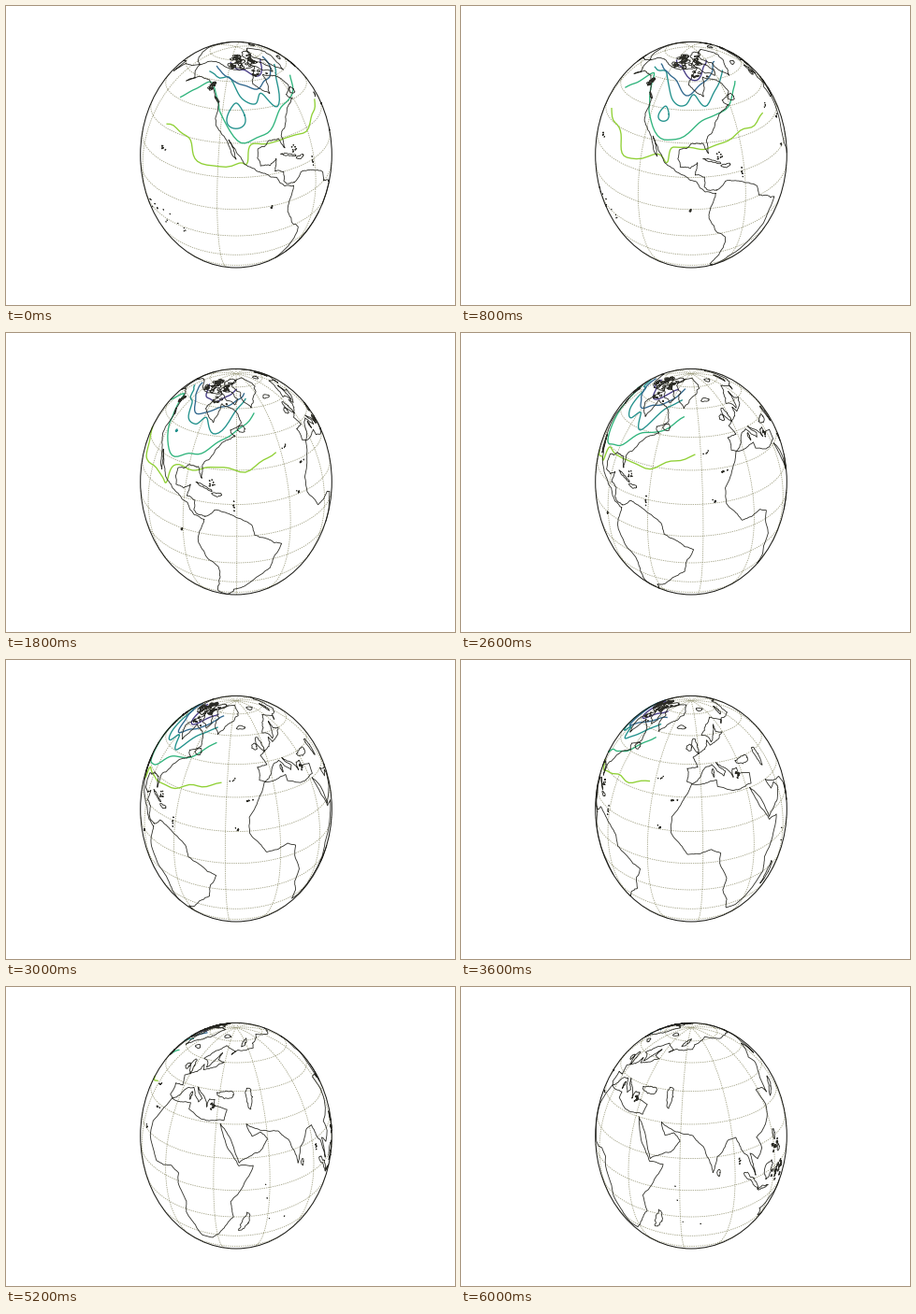
Animation, 480 px wide and 320 px high, one loop 6200 ms. Source, as a matplotlib script:

```python
import numpy as np
import matplotlib.pyplot as plt
from matplotlib.animation import FuncAnimation
from matplotlib.patches import Ellipse

W, H, DPI = 480, 320, 100
FRAMES, STEP_MS = 31, 200
CX, CY, RX, RY = 246, 159.2, 102.3, 120.8
LAT0 = 25
P = 6.61                       # viewer distance in globe radii
K = np.sqrt(P * P - 1)
rng = np.random.default_rng(4)


def center_lon(i):
    return np.interp(i, [0, 4, FRAMES - 1], [-110, -90.5, 66])


def unit(lon, lat):
    lon, lat = np.radians(lon), np.radians(lat)
    return np.stack([np.cos(lat) * np.cos(lon), np.cos(lat) * np.sin(lon),
                     np.sin(lat) + 0 * lon], -1)


def project(pts, lon0):
    """Perspective view of the globe; points behind the limb become gaps."""
    up, east = unit(lon0, LAT0), unit(lon0 + 90, 0)
    x, y, z = np.stack([east, np.cross(up, east), up]) @ pts.T
    far = z < 1 / P
    sx = CX + RX * K * x / (P - z)
    sy = CY - RY * K * y / (P - z)
    sx[far] = np.nan
    return sx, sy


def join(parts):
    gap = np.full((1, 3), np.nan)
    return np.vstack([a for p in parts for a in (p, gap)])


# ---------------------------------------------------------------- coastlines
coasts = []


def coast(p, rough=0.11, levels=4):
    """Fractal shore through a few key points (lon, lat)."""
    p = np.array(p, float).reshape(-1, 2)
    for _ in range(levels):
        a, d = p[:-1], np.diff(p, axis=0)
        squash = np.maximum(np.cos(np.radians(a[:, 1])), 0.2)
        k = rng.uniform(-rough, rough, len(d))
        out = np.empty((2 * len(p) - 1, 2))
        out[::2] = p
        out[1::2] = a + d / 2 + np.stack([k * d[:, 1] / squash, -k * d[:, 0] * squash], 1)
        p = out
    coasts.append(unit(p[:, 0], p[:, 1]))


def island(lon, lat, rx, ry, tilt=0):
    t = np.linspace(0, 2 * np.pi, 10)
    wave = 1 + 0.15 * np.sin(3 * t + rng.uniform(0, 6))
    x, y, a = rx * wave * np.cos(t), ry * wave * np.sin(t), np.radians(tilt)
    u, v = x * np.cos(a) + y * np.sin(a), y * np.cos(a) - x * np.sin(a)
    coast(np.stack([lon + u / np.cos(np.radians(lat)), lat + v], 1), 0.2, 2)


def islands(n, lons, lats, size):
    """Seeded archipelago inside a box."""
    for _ in range(n):
        r = size * rng.uniform(0.4, 1)
        island(rng.uniform(*lons), rng.uniform(*lats), r, r * rng.uniform(0.5, 1),
               rng.uniform(-50, 50))


# North America, Pacific side
coast([-168, 66, -162, 60, -157, 58, -165, 54.5, -151, 60, -139, 59.5, -130, 54, -124, 48,
       -124.3, 40.4, -117, 32.5, -110, 23, -114.5, 31.5, -105.5, 21, -95, 16, -87.5, 13,
       -83, 8.2, -77.5, 7])
# South America
coast([-77.5, 7, -80, 1, -81, -5, -76, -14, -70.5, -18.5, -71.5, -33, -74.5, -46, -69, -55,
       -65.5, -47, -62, -39, -57, -37, -48.6, -28, -40, -21, -38.5, -13, -35, -7, -44, -2.5,
       -50.5, 0, -52, 5, -62, 10, -72, 12, -77, 8.5], 0.08)
# Gulf, Atlantic and Arctic shore
coast([-77, 8.5, -83.5, 10.5, -83.3, 15, -88.3, 16, -87, 21.5, -91, 19, -96.5, 19.5,
       -97.3, 27, -89.5, 30, -84, 30, -80.5, 25.2, -81.3, 31, -75.8, 36, -70.5, 42, -65, 44,
       -61, 45.5, -65, 48.5, -56, 52, -64.5, 60, -70, 61, -77, 62.5, -78, 56, -80, 51.5,
       -93, 58, -86, 66, -82, 69, -96, 68, -115, 68, -130, 70, -156.5, 71, -165, 67.5,
       -168, 66], 0.14)
# Greenland
coast([-60, 82, -30, 83.5, -20, 74, -38, 65.7, -44, 60, -52, 65, -54, 71, -70, 76.5, -60, 82],
      0.15)
# Siberia to the Aegean
coast([190, 66, 160, 70, 128, 72, 104, 77.5, 72, 72, 68, 68.5, 44, 68, 36, 65, 41, 67, 26, 71,
       13, 66, 5, 60, 11, 59, 13, 55.7, 18, 60, 24, 65.7, 22, 61, 29, 60, 21, 56.5, 11, 54,
       9, 57, 8, 54, 2, 51, -4.7, 48.4, -1.5, 43.5, -9, 43, -9, 37, -5.5, 36, 0, 39, 4, 43.3,
       9, 44.3, 16, 38.2, 18, 40.2, 12.5, 45, 19.5, 41, 22.5, 36.7, 23.5, 40.5, 27, 40.5])
# Levant and Africa
coast([27, 40.5, 27, 37.5, 36, 36.5, 34.5, 31.5, 20, 31, 10.5, 34, 10.5, 37, -5.9, 35.8,
       -10, 30, -17, 21, -17, 14, -8, 4.4, 4.5, 6.3, 9.5, 4, 9, -1, 13.5, -10, 12, -17,
       18.3, -34, 26, -34, 35, -23, 40.5, -15, 39, -6, 51, 11.5, 43.3, 11.7, 37, 20,
       32.6, 29.9], 0.06)
# Arabia to the Bering Sea
coast([32.6, 29.9, 35, 28, 43.5, 13, 55, 17.5, 59.8, 22.5, 56, 26, 51, 24.5, 48, 30, 57, 26.5,
       67, 25, 72.8, 20, 77.5, 8, 80.2, 15, 87, 21.5, 92, 22, 94.5, 16, 98.5, 12, 103.4, 1.4,
       100, 13, 105, 9, 109, 13, 106, 19, 118, 24.5, 121.5, 31, 118, 39, 126, 38, 128.5, 35,
       130, 42.5, 140.5, 50, 137, 54, 156, 60, 157, 51, 164, 60, 180, 62.5, 190, 66], 0.08)

# Inland seas and large islands: lon, lat, half sizes, tilt
island(34.5, 43.3, 4.6, 1.6)
island(51, 42, 1.7, 5)
island(-2.5, 54.5, 1.3, 4.2, -15)
island(-8, 53.3, 1.4, 1.7)
island(-18.5, 65, 2.2, 1.2)
island(46.7, -19, 1.9, 6.8, 18)
island(80.7, 7.6, 0.8, 1.6)
island(101, -0.5, 1.2, 7.8, -42)
island(110, -7.4, 4.4, 0.6, 8)
island(114, 0.7, 3.4, 4.6, 30)
island(121.5, 16, 1, 2.6)
island(125, 7.7, 1.4, 1.6)
island(137.5, 36, 1.2, 6, 55)
island(134, -25.5, 18, 9)
island(-79, 21.8, 4.6, 0.5, 18)
island(-71, 19, 2.6, 0.8)
island(-56.3, 49, 1.9, 1.8)
island(-125.8, 49.7, 2, 0.4, 40)
island(-72, 68.5, 2.6, 7.5, -42)
island(-78, 79.5, 2.4, 3.8, 30)
island(-109, 71, 3.2, 1.9)
island(17, 78.8, 1.8, 1.5)
island(58, 73.5, 0.7, 3.8, 35)
island(9, 40.5, 0.5, 1.9)

islands(24, (-125, -75), (69, 79), 1.6)      # Canadian Arctic
islands(8, (-90, -68), (62, 70), 0.9)
islands(14, (-136, -131), (54, 58.5), 0.8)   # Alaska panhandle
islands(12, (118, 126), (7, 13), 0.9)        # Philippines
islands(16, (116, 130), (-9, 0), 1.2)        # East Indies
islands(9, (23.5, 28), (35.3, 39.5), 0.4)    # Aegean
islands(7, (-78, -72), (21.5, 26), 0.4)      # Bahamas
islands(6, (-61.8, -61), (12, 17), 0.25)     # Antilles
islands(5, (-18, -14), (28, 28.7), 0.35)     # Canaries
islands(5, (-25, -23), (15, 17), 0.25)       # Cape Verde
islands(4, (-29, -25), (37, 39), 0.25)       # Azores
islands(4, (-91.3, -89.8), (-1, 0), 0.4)     # Galapagos
islands(5, (-159, -155), (19.5, 21.7), 0.4)  # Hawaii
islands(14, (-172, -140), (-19, -10), 0.22)  # Polynesia
islands(4, (55, 73), (-20, 3), 0.2)          # Indian Ocean
islands(5, (92.5, 93.5), (7, 13), 0.3)       # Andamans
land = join(coasts)

# ---------------------------------------------------------------- isotherms
# colour, then the mean latitude along the line at a few longitudes
ISOTHERMS = [
    ("#8fd034", [-160, -140, -132, -110, -104, -101, -85, -76, -55, -34],
     [32, 29, 20, 22, 20, 28, 28, 29.5, 31, 36]),
    ("#2fb47c", [-159, -149, -138, -125, -121, -107, -90, -75, -62, -43],
     [47, 53, 59.5, 48, 42, 31, 35, 42, 46, 56]),
    ("#21918c", [-145, -118, -105, -95, -88, -78, -62, -48], [65, 61, 50, 48, 53, 46, 58, 65]),
    ("#31688e", [-140, -112, -95, -80, -68, -48], [69, 61, 54, 59, 62, 71]),
    ("#443983", [-120, -100, -85, -72, -60], [73, 66, 62, 68, 73]),
]
phases = rng.uniform(0, 2 * np.pi, (len(ISOTHERMS), 3))


def curve(x, y, n=8):
    """Catmull-Rom curve through the points."""
    p = np.stack([x, y], 1).astype(float)
    q = np.vstack([2 * p[0] - p[1], p, 2 * p[-1] - p[-2]])
    a, b, c, d = (q[k:len(q) - 3 + k, None] for k in range(4))
    t = np.linspace(0, 1, n)[None, :, None]
    s = b + t * (c - a) / 2 + t**2 * (a - 2.5 * b + 2 * c - d / 2) \
        + t**3 * (1.5 * (b - c) + (d - a) / 2)
    return s.reshape(-1, 2).T


def isotherm(level, i):
    _, lons, lats = ISOTHERMS[level]
    lon, lat = curve(lons, lats)
    for k, ph in enumerate(phases[level], 1):
        lat = lat + 1.2 / k * np.sin(0.12 * k * lon + ph + 0.5 * i)
    return unit(lon, lat)


def cold_pool(i):
    """Closed line over the Rockies that shrinks away."""
    t = np.linspace(0, 2 * np.pi, 40)
    r = max(0, 6 - 0.6 * i)
    return unit(-110 + r * np.cos(t) * (1 - 0.4 * np.sin(t)), 42.5 + r * np.sin(t))


# ---------------------------------------------------------------- graticule
def graticule(step):
    span, lats = np.arange(-180, 181, 2.0), np.arange(-90, 91, 2.0)
    return join([unit(span, np.full_like(span, lat)) for lat in range(-75, 90, 15)]
                + [unit(np.full_like(lats, lon), lats) for lon in range(-180, 180, step)])


coarse, fine = graticule(60), graticule(30)

# ---------------------------------------------------------------- drawing
fig = plt.figure(figsize=(W / DPI, H / DPI), dpi=DPI, facecolor="white")
ax = fig.add_axes([0, 0, 1, 1])
ax.set(xlim=(0, W), ylim=(H, 0))
ax.axis("off")
ax.add_patch(Ellipse((CX, CY), 2 * RX, 2 * RY, fc="none", ec="#1c1c18", lw=0.75, zorder=5))
iso_lines = [ax.plot([], [], color=c, lw=0.95, zorder=2)[0] for c, *_ in ISOTHERMS]
pool_line, = ax.plot([], [], color="#21918c", lw=0.95, zorder=2)
coast_line, = ax.plot([], [], color="#2c2c26", lw=0.6, zorder=3)
grid_line, = ax.plot([], [], color="#a4a488", lw=0.6, ls=(0, (1.6, 1.2)), zorder=1)


def draw(i):
    lon0 = center_lon(i)
    coast_line.set_data(*project(land, lon0))
    grid_line.set_data(*project(coarse if lon0 < -90 else fine, lon0))
    pool_line.set_data(*project(cold_pool(i), lon0))
    for level, line in enumerate(iso_lines):
        line.set_data(*project(isotherm(level, i), lon0))
    return [coast_line, grid_line, pool_line, *iso_lines]


anim = FuncAnimation(fig, draw, frames=FRAMES, interval=STEP_MS, repeat=True, repeat_delay=0)
plt.show()
```
